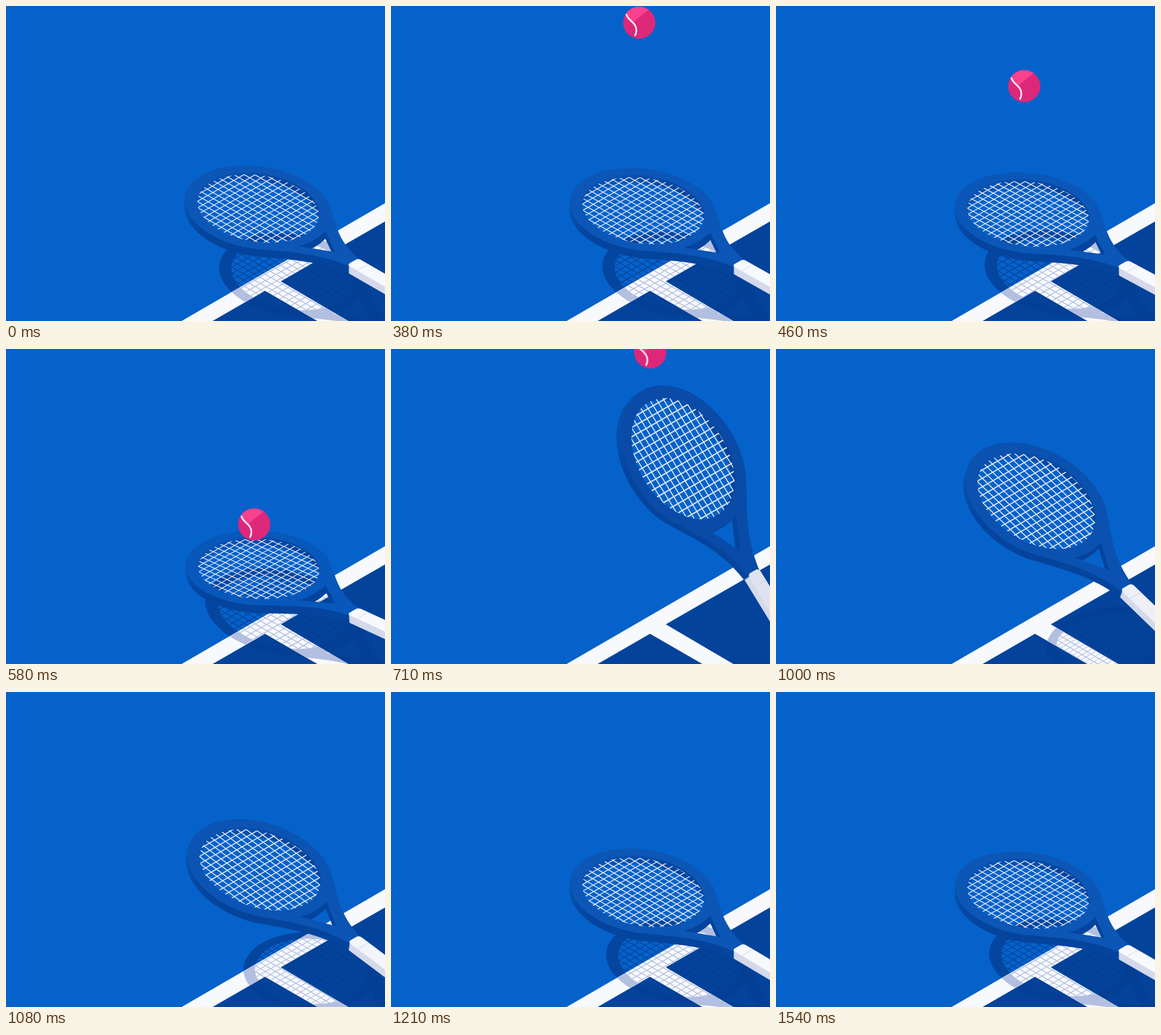
An HTML page without scripts for the animation above (2.5 s loop, 600 by 500 pixels).

```html
<!DOCTYPE html>
<html lang="en">
<head>
<meta charset="utf-8">
<title>Tennis racket</title>
<style>
  @property --tilt { syntax: "<angle>"; inherits: true; initial-value: 0deg; }
  @property --face { syntax: "<color>"; inherits: true; initial-value: #0c56b6; }
  @property --handle { syntax: "<color>"; inherits: true; initial-value: #f8f9fd; }

  html, body { margin: 0; width: 100%; height: 100%; overflow: hidden; background: #0562ca; }
  svg { display: block; width: 600px; height: 500px; animation: swing 2.5s linear infinite; }

  /* Isometric projection of the racket plane, hinged at the far end of the grip */
  .layer, .shadow { --cos: cos(var(--tilt)); --sin: sin(var(--tilt)); }
  .layer {
    --ux: (-.866 * var(--cos));
    --uy: (-.5 * var(--cos) - var(--sin));
    transform: matrix(
      calc(var(--ux)), calc(var(--uy)), .866, -.5,
      calc(634.6 + 272 * var(--ux) + var(--z) * .866 * var(--sin)),
      calc(459 + 272 * var(--uy) + var(--z) * (.5 * var(--sin) - var(--cos))));
    --frame: url(#side);
    --grip: #d4d9eb;
    --string: #e0e7f6;
  }
  .top { --frame: var(--face); --grip: var(--handle); }

  /* The same plane cast onto the floor */
  .shadow {
    --ux: (-.866 * var(--cos) + .67 * var(--sin));
    --uy: (-.5 * var(--cos) + .36 * var(--sin));
    transform: matrix(
      calc(var(--ux)), calc(var(--uy)), .866, -.5,
      calc(689 + 272 * var(--ux)), calc(563 + 272 * var(--uy)));
    --frame: var(--shade);
    --grip: var(--shade);
    --string: var(--shade);
  }

  .frame { fill: var(--frame); fill-rule: evenodd; }
  .grip { fill: var(--grip); }
  .strings { fill: none; stroke: var(--string); }
  .ball { animation: bounce 2.5s step-end infinite; }

  @keyframes swing {
    0% { --tilt: 0deg; --face: #0c56b6; --handle: #f8f9fd; animation-timing-function: cubic-bezier(.64, 0, .78, 0); }
    23.2% { --tilt: -5.7deg; --face: #0758ba; --handle: #f8f9fd; }
    25.2% { --tilt: -6.5deg; --face: #0758ba; --handle: #f8f9fd; animation-timing-function: steps(2); }
    28.4% { --tilt: 42.5deg; --face: #094ba7; --handle: #dfe2ef; animation-timing-function: ease-out; }
    29.2% { --tilt: 44deg; --face: #094ba7; --handle: #dfe2ef; animation-timing-function: cubic-bezier(.37, 0, .63, 1); }
    48.8% { --tilt: .7deg; --face: #0c56b6; --handle: #f8f9fd; animation-timing-function: ease-in-out; }
    61.6%, 100% { --tilt: 0deg; --face: #0c56b6; --handle: #f8f9fd; }
  }
  /* The ball moves at 24 pictures a second */
  @keyframes bounce {
    0% { transform: translate(393px, -75px); }
    12% { transform: translate(393px, -75px); animation-timing-function: steps(2); }
    15.2% { transform: translate(393px, 26.5px); animation-timing-function: steps(5); }
    23.2% { transform: translate(393px, 278.5px); }
    25.2% { transform: translate(393px, 336px); animation-timing-function: steps(2); }
    28.4% { transform: translate(410.5px, 5.5px); }
    30%, 100% { transform: translate(418px, -75px); }
  }
</style>
</head>
<body>
<svg viewBox="0 0 600 500">
  <defs>
    <linearGradient id="side" gradientUnits="userSpaceOnUse" x1="10" x2="100" y1="0" y2="0">
      <stop stop-color="#04449d"/>
      <stop offset="1" stop-color="#0753b3"/>
    </linearGradient>
    <path id="court" d="M327 500 600 342V500z"/>
    <path id="lines" d="M278 500 600 313V342L435 437 542 500H493L410 452 327 500z"/>
    <clipPath id="on-court"><use href="#court"/></clipPath>
    <clipPath id="on-lines"><use href="#lines"/></clipPath>
    <clipPath id="opening"><ellipse rx="86" ry="71"/></clipPath>

    <!-- x runs along the racket towards the tip, y across it -->
    <g id="body">
      <path class="frame" d="M-60 70A103 86 0 1 0 -60 -70C-98 -43 -126 -17 -176 -10V10C-126 19 -98 45 -60 70z
        M-86 0A86 71 0 1 1 86 0A86 71 0 1 1 -86 0z
        M-141 0L-99 24Q-106 0 -99 -24z"/>
      <rect class="grip" x="-340" y="-9.5" width="168" height="20.5" rx="5"/>
    </g>
    <g id="strings" class="strings" clip-path="url(#opening)">
      <path d="M-90 0H90" stroke-width="144" stroke-dasharray="1.6 8.9"/>
      <path d="M0 -72.05V72" stroke-width="176" stroke-dasharray="1.6 7.9"/>
    </g>
    <g id="silhouette">
      <use href="#body"/>
      <use href="#strings"/>
    </g>
  </defs>

  <rect width="600" height="500" fill="#0562ca"/>
  <g class="shadow" style="--shade:#04459f"><use href="#silhouette"/></g>
  <use href="#court" fill="#04439b"/>
  <g clip-path="url(#on-court)">
    <g class="shadow" style="--shade:#033f95"><use href="#silhouette"/></g>
  </g>
  <use href="#lines" fill="#f7f9fc"/>
  <g clip-path="url(#on-lines)">
    <g class="shadow" style="--shade:#b3bfe0"><use href="#silhouette"/></g>
  </g>

  <g class="layer" style="--z:-9"><use href="#body"/></g>
  <g class="layer" style="--z:-7"><use href="#body"/></g>
  <g class="layer" style="--z:-5"><use href="#body"/></g>
  <g class="layer" style="--z:-3"><use href="#body"/></g>
  <g class="layer" style="--z:-1"><use href="#body"/></g>
  <g class="layer" style="--z:0"><use href="#strings"/></g>
  <g class="layer" style="--z:1"><use href="#body"/></g>
  <g class="layer top" style="--z:3">
    <use href="#body"/>
    <path d="M-190 -9.5V11" stroke="#d3d8ea"/>
  </g>

  <g class="ball">
    <circle r="25.5" fill="#dd2879"/>
    <path fill="#fc418f" d="M-20 -16C-17 -7 -12 -6 -9 -1Q3 -12 15 -20.6A25.5 25.5 0 0 0 -20 -16z"/>
    <path fill="none" stroke="#f3f0f8" stroke-width="2.6" d="M-20.5 -14C-19 -3 -5 -2 -4.5 12Q-4.5 17 -7 21"/>
  </g>
</svg>
</body>
</html>
```
